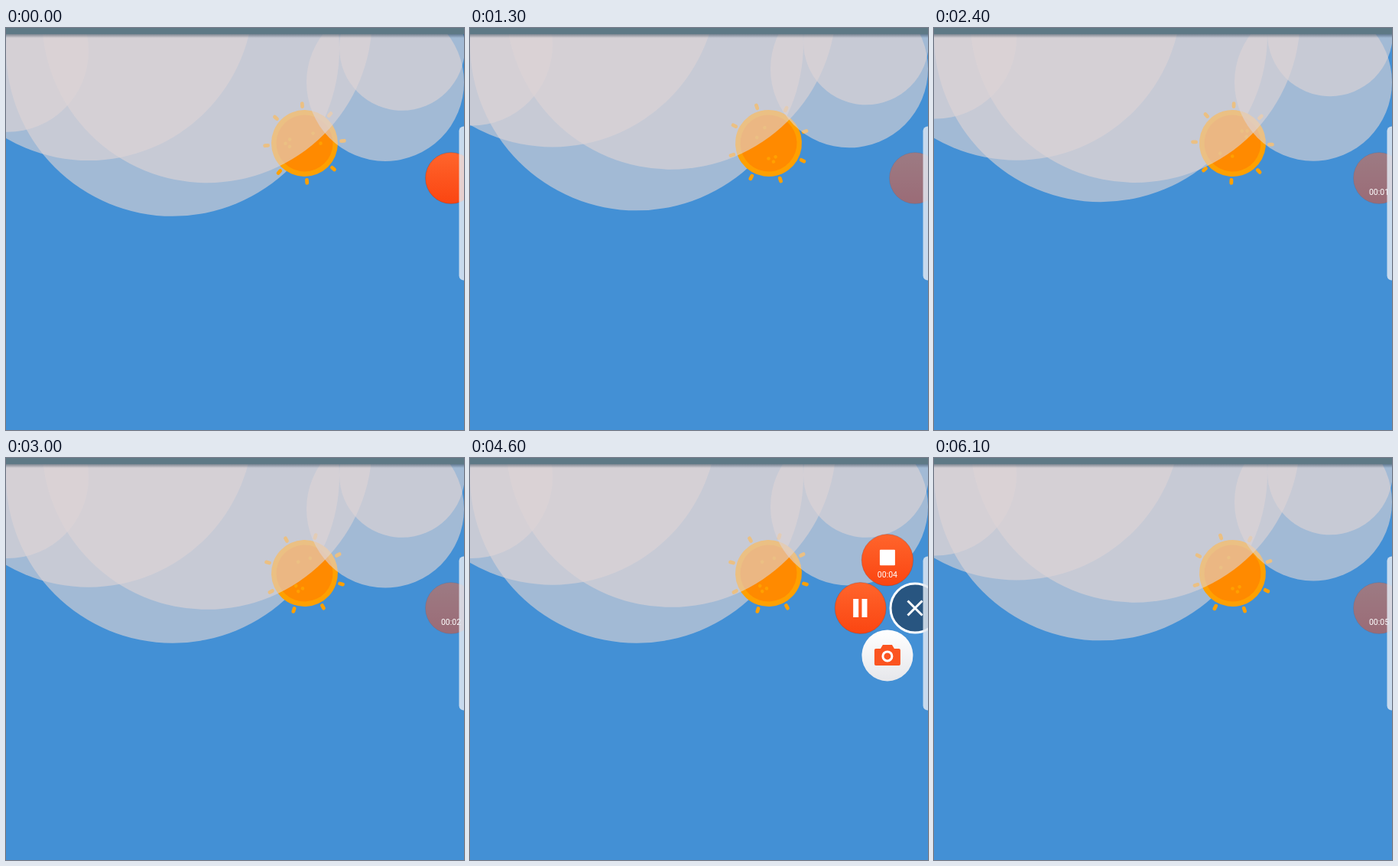
Write an HTML page that moves like this. It is 599 px wide and 525 px high and loops after 6.2 s.

```html
<!DOCTYPE html>
<html lang="en">
<head>
<meta charset="utf-8">
<title>Sun and clouds</title>
<style>
  html, body { margin: 0; width: 100%; height: 100%; overflow: hidden; background: #4390d5; }
  svg { display: block; }
  text { font: 10.5px Roboto, sans-serif; fill: #fff; text-anchor: middle; }
</style>
</head>
<body>
<svg width="599" height="525" viewBox="0 0 599 525">
  <defs>
    <linearGradient id="hot" x2="0" y2="1">
      <stop stop-color="#ff652c"/><stop offset="1" stop-color="#fb4511"/>
    </linearGradient>
    <linearGradient id="pale" x2="0" y2="1">
      <stop stop-color="#fff"/><stop offset="1" stop-color="#e6e7eb"/>
    </linearGradient>
    <linearGradient id="shade" x2="0" y2="1">
      <stop stop-color="#23384a" stop-opacity=".5"/><stop offset="1" stop-color="#23384a" stop-opacity="0"/>
    </linearGradient>
  </defs>
  <rect width="599" height="525" fill="#4390d5"/>
  <g id="back"></g>
  <g id="sun">
    <circle r="43.5" fill="#ffa000"/>
    <circle r="37" fill="#ff8a00"/>
  </g>
  <g id="front"></g>
  <rect y="8" width="599" height="5" fill="url(#shade)"/>
  <rect width="599" height="8" fill="#5e7986"/>

  <g id="badge">
    <circle cx="582" cy="196" r="33.5" fill="url(#hot)" stroke="#633" stroke-opacity=".25"/>
  </g>
  <text id="clock" x="582" y="218.3"></text>

  <g id="menu">
    <g id="stop">
      <circle r="33.7" fill="url(#hot)" stroke="#633" stroke-opacity=".25"/>
      <rect x="-10" y="-13.5" width="20" height="20.5" rx="1" fill="#fff"/>
      <text id="clock2" y="22.5"></text>
    </g>
    <g id="pause">
      <circle r="33.5" fill="url(#hot)" stroke="#633" stroke-opacity=".25"/>
      <path d="M-9.5-12h7v24h-7zM1.8-12h7v24h-7z" fill="#fff"/>
    </g>
    <g id="photo">
      <circle r="33.5" fill="url(#pale)"/>
      <path d="M-15-9h6l3-5h12l3 5h6q2 0 2 2v18q0 2-2 2h-30q-2 0-2-2v-18q0-2 2-2z" fill="#fb5420"/>
      <circle cy="1" r="6" fill="none" stroke="#fff" stroke-width="3"/>
    </g>
    <g transform="translate(582 196)">
      <circle r="32" fill="#285580" stroke="#fff" stroke-width="3"/>
      <path d="M-9.5-9.5L9.5 9.5M9.5-9.5L-9.5 9.5" stroke="#fff" stroke-width="3"/>
    </g>
  </g>
  <rect x="592.5" y="128.5" width="20" height="201" rx="6" fill="#e2e9f2" fill-opacity=".84"/>
</svg>
<script>
const LOOP = 6200, STEP = 100;
const $ = id => document.getElementById(id);
const TAU = Math.PI * 2;

function add(parent, tag, attrs) {
  const el = document.createElementNS('http://www.w3.org/2000/svg', tag);
  for (const k in attrs) el.setAttribute(k, attrs[k]);
  parent.appendChild(el);
  return el;
}

// Each cloud bobs vertically: x, radius, middle height of its lower edge, swing, period, peak time
const clouds = [
  ['back', 218, 218, 236.5, 9.5, 1.6, .05],
  ['front', 108, 216, 164.3, 9, 2.65, -.1],
  ['front', 2, 106, 127.2, 9.2, 1.6, .09],
  ['front', 263, 216, 193.5, 9, 2.65, -.1],
  ['front', 496, 103, 165.2, 9, 2.65, -.1],
  ['front', 518, 82, 98.5, 9.5, 1.6, .05]
].map(([layer, x, r, mid, amp, period, peak]) => ({
  el: add($(layer), 'circle', { cx: x, r, fill: '#ded5d6', 'fill-opacity': .61 }),
  y: s => mid - r + amp * Math.cos(TAU * (s - peak) / period)
}));

for (let i = 0; i < 8; i++)
  add($('sun'), 'path', {
    d: 'M48 0H52', stroke: '#ffa000', 'stroke-width': 4.8,
    'stroke-linecap': 'round', transform: `rotate(${45 * i - 4})`
  });
for (const [deg, r] of [[14, 20], [-1, 25], [-13, 20], [130, 17], [180, 21]])
  add($('sun'), 'circle', { cx: r, r: 2.3, fill: '#ffa000', transform: `rotate(${deg})` });

const ramp = (s, a, b) => Math.min(1, Math.max(0, (s - a) / (b - a)));

// One turn per 1.6 s, easing in and out
function spin(s) {
  const u = ((s - .67) / 1.6 % 1 + 1) % 1;
  return 315 + 180 * (1 - Math.cos(Math.PI * u));
}

function overshoot(p) {
  const q = p - 1;
  return q * q * (3 * q + 2) + 1;
}

const buttons = [['stop', -42, -73], ['pause', -83, 0], ['photo', -42, 72]];

function draw(ms) {
  const s = ms / 1000;
  for (const c of clouds) c.el.setAttribute('cy', c.y(s));
  $('sun').setAttribute('transform', `translate(390.5 150.5) rotate(${spin(s)})`);

  const open = s >= 4.6 && s < 5.8;
  const faded = s < 4.4 ? ramp(s, .3, .6) : ramp(s, 5.75, 6);
  const time = s < 1.5 ? '' : '00:0' + Math.floor(s - .5 + 1e-6);
  $('clock').textContent = time;
  $('clock2').textContent = time;
  $('badge').setAttribute('opacity', 1 - .52 * faded);
  $('badge').style.display = $('clock').style.display = open ? 'none' : '';
  $('menu').style.display = open ? '' : 'none';
  if (open) {
    const k = overshoot(ramp(s, 4.5, 4.9)) * (1 - ramp(s, 5.6, 5.85));
    for (const [id, dx, dy] of buttons)
      $(id).setAttribute('transform', `translate(${582 + dx * k} ${196 + dy * k})`);
  }
}

let start;
function tick(now) {
  if (start === undefined) start = now;
  draw(Math.floor((now - start) % LOOP / STEP) * STEP);
  requestAnimationFrame(tick);
}
draw(0);
requestAnimationFrame(tick);
</script>
</body>
</html>
```
